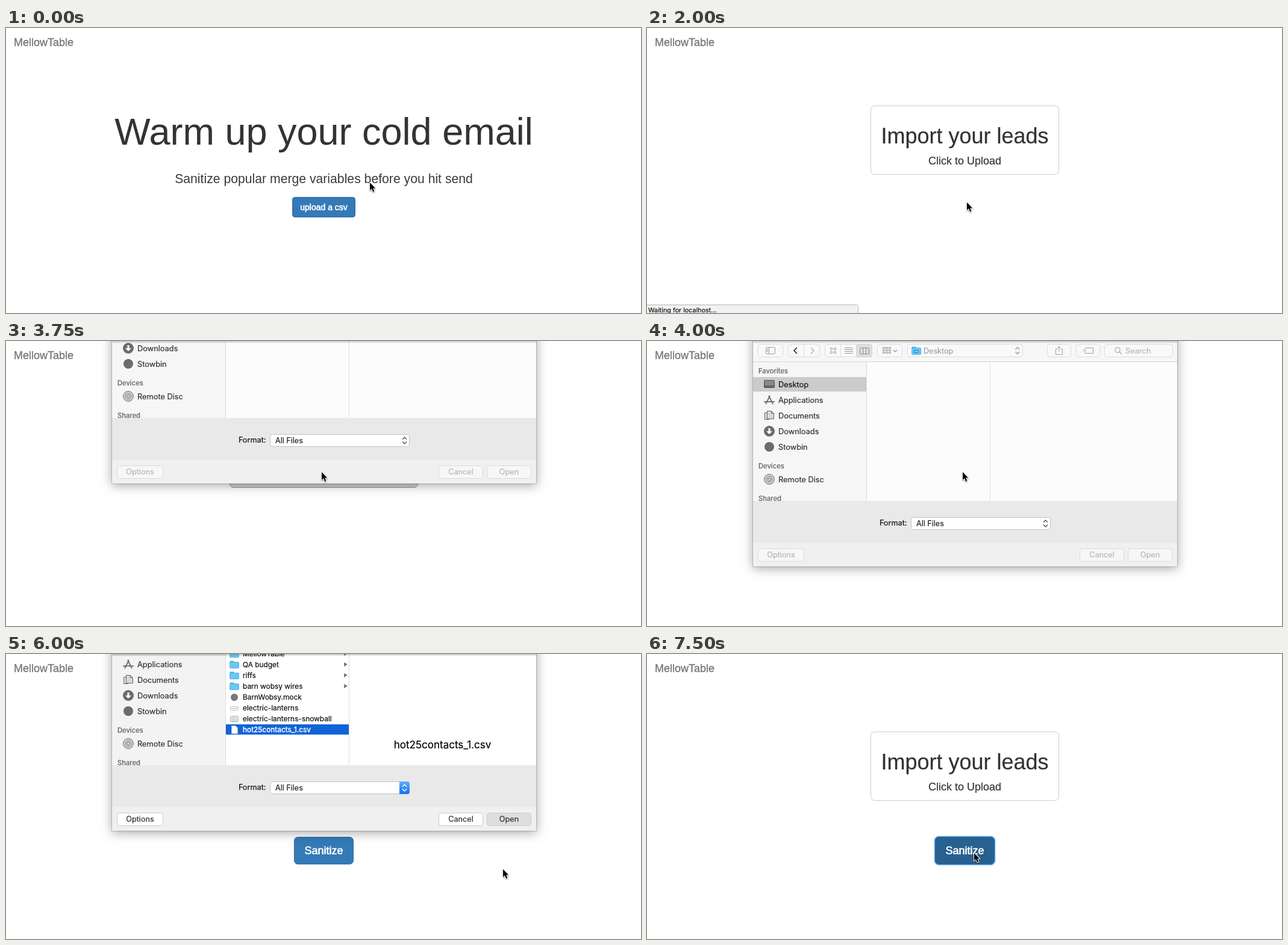
An HTML page with a canvas that plays this animation: 1054x474 px, repeating every 8 s.

```html
<!DOCTYPE html>
<html lang="en">
<head>
<meta charset="utf-8">
<title>Upload flow</title>
<style>
html, body { margin: 0; width: 100%; height: 100%; overflow: hidden; background: #fff; }
canvas { display: block; }
</style>
</head>
<body>
<canvas id="stage" width="1054" height="474"></canvas>
<script>
const ctx = document.getElementById('stage').getContext('2d');
const LOOP = 8000, STEP = 250;
const SANS = '"Liberation Sans", Arial, sans-serif';
const UI = 'Inter, Roboto, sans-serif';

// cursor keys: time, x, y
const CURSOR = [
  [0, 604, 257], [500, 531, 290], [2000, 531, 290], [2500, 524, 218],
  [4250, 524, 218], [4750, 490, 207], [5000, 490, 207], [5500, 825, 358],
  [6250, 825, 358], [7250, 543, 331]
];

const FILES = [
  ['pond_test.html', 'dot'], ['pond-seo.png', 'thumb'], ['MellowTable', 'folder'],
  ['QA budget', 'folder'], ['riffs', 'folder'], ['barn wobsy wires', 'folder'],
  ['BarnWobsy.mock', 'disc'], ['electric-lanterns', 'thumb'],
  ['electric-lanterns-snowball', 'page'], ['hot25contacts_1.csv', 'doc']
];

function text(str, x, y, size, color, opt = {}) {
  const heavy = opt.heavy ?? .2;
  ctx.font = `${opt.weight || 400} ${size}px ${opt.font || UI}`;
  ctx.textAlign = opt.align || 'left';
  ctx.fillStyle = color;
  ctx.fillText(str, x, y);
  if (heavy) {
    ctx.strokeStyle = color;
    ctx.lineWidth = heavy;
    ctx.strokeText(str, x, y);
  }
}

function rect(x, y, w, h, color) {
  ctx.fillStyle = color;
  ctx.fillRect(x, y, w, h);
}

function box(x, y, w, h, r, fill, stroke) {
  ctx.beginPath();
  ctx.roundRect(x + .5, y + .5, w - 1, h - 1, r);
  if (fill) { ctx.fillStyle = fill; ctx.fill(); }
  if (stroke) { ctx.strokeStyle = stroke; ctx.lineWidth = 1; ctx.stroke(); }
}

function line(pts, color, width = 1, fill) {
  ctx.beginPath();
  for (let i = 0; i < pts.length; i += 2) ctx.lineTo(pts[i], pts[i + 1]);
  if (fill) { ctx.closePath(); ctx.fillStyle = fill; ctx.fill(); }
  if (color) { ctx.strokeStyle = color; ctx.lineWidth = width; ctx.stroke(); }
}

function circle(x, y, r, fill, stroke, width = 1) {
  ctx.beginPath();
  ctx.arc(x, y, r, 0, 7);
  if (fill) { ctx.fillStyle = fill; ctx.fill(); }
  if (stroke) { ctx.strokeStyle = stroke; ctx.lineWidth = width; ctx.stroke(); }
}

function vGrad(y0, y1, a, b) {
  const g = ctx.createLinearGradient(0, y0, 0, y1);
  g.addColorStop(0, a);
  g.addColorStop(1, b);
  return g;
}

function upDown(x, y, color) {
  line([x - 3.5, y - 2, x, y - 5.5, x + 3.5, y - 2], color, 1.4);
  line([x - 3.5, y + 2, x, y + 5.5, x + 3.5, y + 2], color, 1.4);
}

function folder(x, y, w, h) {
  box(x, y, w * .5, 5, 1, '#4aaede');
  box(x, y + 2, w, h - 2, 1, '#6cc7f4', '#55b5e6');
}

function primary(x, y, w, h, r, label, size, base, hover, focus) {
  if (focus) {
    ctx.save();
    ctx.shadowColor = '#5fa8f5';
    ctx.shadowBlur = 2;
    box(x - 1.5, y - 1.5, w + 3, h + 3, r + 1.5, '#66aaf2');
    ctx.restore();
  }
  box(x, y, w, h, r, hover ? '#286090' : '#337ab7', focus ? '#2a66a6' : hover ? '#204d74' : '#2e6da4');
  text(label, x + w / 2, base, size, '#fff', { font: SANS, align: 'center', heavy: .6 });
}

function home(t) {
  const mid = { font: SANS, align: 'center', heavy: 0 };
  text('Warm up your cold email', 527.5, 194, 63, '#333', mid);
  text('Sanitize popular merge variables before you hit send', 527.5, 258, 21.2, '#3a3a3a', mid);
  primary(475, 281, 105, 34, 4, 'upload a csv', 14, 303, t >= 500, t >= 750);
}

function importPage(t) {
  const mid = { font: SANS, align: 'center' };
  const pressed = t >= 2750 && t < 6250;
  const gray = t >= 2500 && t < 7500;
  box(371, 129, 313, 115, 6, pressed ? '#d4d4d4' : gray ? '#e6e6e6' : '#fff',
    pressed ? '#8c8c8c' : gray ? '#a0a0a0' : '#ccc');
  if (pressed) rect(372, 130, 311, 6, vGrad(130, 136, 'rgba(0,0,0,.12)', 'rgba(0,0,0,0)'));
  text('Import your leads', 527.5, 192, 36, '#333', mid);
  text('Click to Upload', 527.5, 227, 18, '#333', mid);
  if (t >= 6000) primary(478, 304, 99, 46, 6, 'Sanitize', 18, 333, t >= 7250, t >= 7500);
}

function statusBar(alpha) {
  ctx.globalAlpha = alpha;
  box(-4, 460, 355, 20, 3, '#f2f2f2', '#b4b4b4');
  text('Waiting for localhost...', 2, 473, 10.8, '#111');
  ctx.globalAlpha = 1;
}

function toolbar(on) {
  const ink = on ? '#4a4a4a' : '#9a9a9a', pale = '#b8b8b8';
  const edge = on ? '#cdcdcd' : '#dcdcdc', face = on ? '#fff' : '#f9f9f9';
  rect(176, 0, 704, 37, on ? vGrad(0, 37, '#f3f3f3', '#ececec') : '#f7f7f7');
  rect(176, 36, 704, 1, '#d4d4d4');
  for (const [x, w] of [[184, 42], [234, 53], [295, 79], [382, 42], [432, 192], [664, 40], [712, 40], [759, 114]])
    box(x, 7, w, 22, 4, face, edge);
  rect(260, 8, 1, 20, edge);
  rect(321, 8, 1, 20, edge);

  box(197, 12, 16, 12, 1, null, ink);
  line([202.5, 12, 202.5, 24], ink);
  for (const y of [15, 17, 19]) rect(199, y, 2, 1, ink);

  line([249, 13, 244, 18, 249, 23], on ? pale : '#222', 1.6);
  line([272, 13, 277, 18, 272, 23], pale, 1.6);

  for (let i = 0; i < 4; i++) box(304 + i % 2 * 6, 13 + (i >> 1) * 6, 4, 4, .5, null, ink);
  for (let i = 0; i < 4; i++) rect(328, 13 + i * 3, 14, 1, ink);
  box(347, 7, 27, 22, 3, on ? '#6b6b6b' : '#dedede', on ? '#666' : '#d2d2d2');
  const col = on ? '#fff' : '#8c8c8c';
  box(353, 13, 16, 11, 1, null, col);
  line([358.5, 13, 358.5, 24], col);
  line([363.5, 13, 363.5, 24], col);

  for (let i = 0; i < 9; i++) box(391 + i % 3 * 5, 12 + (i / 3 | 0) * 4, 4, 3, 0, null, ink);
  line([409, 17, 412, 20, 415, 17], ink, 1.4);

  folder(439, 11, 16, 14);
  box(443, 17, 8, 5, 0, null, '#1d82bd');
  text('Desktop', 459, 23, 12.6, on ? '#4a4a4a' : '#a0a0a0');
  upDown(615, 18, ink);

  line([681, 15.5, 678.5, 15.5, 678.5, 24.5, 689.5, 24.5, 689.5, 15.5, 687, 15.5], ink);
  line([684, 20, 684, 11], ink);
  line([681, 14, 684, 11, 687, 14], ink);
  line([724.5, 18, 728, 13.5, 740.5, 13.5, 740.5, 22.5, 728, 22.5, 724.5, 18], ink);
  circle(728.5, 18, 1, ink);

  circle(781, 17, 4.2, null, on ? '#777' : '#aaa', 1.3);
  line([784, 20, 788, 24], on ? '#777' : '#aaa', 1.5);
  text('Search', 794, 23, 12.8, on ? '#a6a6a6' : '#b8b8b8');
}

const SIDE_ICONS = [
  y => {
    box(194, y - 7, 18, 13, 1.5, '#8a8a8a', '#4b4b4b');
    rect(195, y + 2, 16, 3, '#555');
    for (let i = 0; i < 5; i++) rect(197 + i * 3, y + 3, 1, 1, '#ddd');
  },
  y => {
    line([197, y + 7, 204, y - 7], '#666', 1.7);
    line([202, y - 7, 209, y + 7], '#666', 1.7);
    line([194, y + 3, 212, y + 3], '#666', 1.7);
  },
  y => {
    line([195.5, y - 4.5, 202.5, y - 4.5, 202.5, y + 6.5, 195.5, y + 6.5, 195.5, y - 4.5], '#666', 1, '#ddd');
    line([199.5, y - 7.5, 206.5, y - 7.5, 210.5, y - 3.5, 210.5, y + 5.5, 199.5, y + 5.5, 199.5, y - 8], '#666', 1, '#d8d8d8');
    line([206.5, y - 7.5, 206.5, y - 3.5, 210.5, y - 3.5], '#666');
  },
  y => {
    circle(203, y, 9, '#6c6c6c');
    rect(201.5, y - 5, 3, 6, '#fff');
    line([198, y, 208, y, 203, y + 5], null, 1, '#fff');
  },
  y => circle(203, y, 8, '#6c6c6c')
];

function sidebar(on) {
  const ink = '#303030', gray = '#6c6c6c', head = { weight: 500 };
  rect(176, 37, 188, 231, on ? '#f3f3f3' : '#f6f6f6');
  rect(176, 62, 188, 24, on ? '#e4e4e4' : '#cbcbcb');
  text('Favorites', 185, 56, 11.2, gray, head);
  ['Desktop', 'Applications', 'Documents', 'Downloads', 'Stowbin'].forEach((name, i) => {
    const y = 74 + i * 26;
    SIDE_ICONS[i](y);
    text(name, 218, y + 5, 12.8, i ? ink : '#111');
  });
  text('Devices', 185, 214, 11.2, gray, head);
  circle(203, 232, 8.5, '#c9c9c9', '#777');
  circle(203, 232, 4.5, null, '#888');
  circle(203, 232, 1.8, '#fff', '#777');
  text('Remote Disc', 218, 237, 12.8, ink);
  text('Shared', 185, 268, 11.2, gray, head);
}

function fileIcon(kind, y) {
  if (kind === 'folder') folder(371, y - 7, 16, 13);
  if (kind === 'dot') circle(379, y - 1, 4, '#c8574a');
  if (kind === 'disc') circle(379, y, 6, '#777');
  if (kind === 'thumb') {
    box(372, y - 3, 14, 7, 1, '#fff', '#bbb');
    rect(374, y, 10, 1, '#aaa');
  }
  if (kind === 'page') {
    box(372, y - 5, 14, 10, 1, '#f4f4f4', '#aaa');
    for (const d of [-3, -1, 1, 3]) rect(374, y + d, 10, 1, '#c4c4c4');
  }
  if (kind === 'doc')
    line([374.5, y - 6.5, 381, y - 6.5, 384.5, y - 3, 384.5, y + 6.5, 374.5, y + 6.5, 374.5, y - 7], '#bbb', 1, '#fff');
}

function files(chosen) {
  FILES.forEach(([name, kind], i) => {
    const y = 47 + i * 18, hit = chosen && i === 9;
    if (hit) rect(365, 200, 204, 17, '#1164d8');
    fileIcon(kind, y);
    text(name, 393, y + 4, 11.9, hit ? '#fff' : '#111', { heavy: hit ? .4 : .2 });
    if (kind === 'folder') line([561, y - 4, 567, y - 1, 561, y + 3], null, 1, '#777');
  });
  if (chosen) text('hot25contacts_1.csv', 724.5, 240, 17, '#000', { align: 'center' });
}

function pushButton(x, w, label, on, down) {
  box(x, 347, w, 22, 4, down ? '#dedede' : on ? '#fff' : '#f7f7f7', on ? '#cbcbcb' : '#dadada');
  text(label, x + w / 2, 362, 12.7, on ? '#303030' : '#b5b5b5', { align: 'center' });
}

function dialog(t) {
  const on = t >= 4250, chosen = t >= 5000;
  const dy = t < 4000 ? -140 : t < 4250 ? -2 : t < 6000 ? 0 : -83;
  ctx.save();
  ctx.translate(0, dy);
  ctx.save();
  ctx.shadowColor = 'rgba(0,0,0,.36)';
  ctx.shadowBlur = 17;
  ctx.shadowOffsetY = 3;
  rect(176, -20, 704, 397, '#efefef');
  ctx.restore();
  box(175, -20, 706, 398, 0, null, 'rgba(0,0,0,.16)');

  rect(364, 37, 516, 231, on ? '#fff' : '#fcfcfc');
  toolbar(on);
  sidebar(on);
  rect(364, 37, 1, 231, '#dadada');
  if (on) files(chosen);
  rect(569, 37, 1, 231, '#dedede');

  rect(176, 268, 704, 70, '#e9e9e9');
  rect(176, 338, 704, 39, '#f0f0f0');
  text('Format:', 431.5, 309, 12.7, '#111', { align: 'right' });
  box(438, 295, 232, 21, 4, '#fff', '#c2c2c2');
  text('All Files', 447, 310, 12.6, '#222');
  if (on) {
    ctx.beginPath();
    ctx.roundRect(653, 295, 17, 21, [0, 4, 4, 0]);
    ctx.fillStyle = vGrad(295, 316, '#60aefb', '#1570f2');
    ctx.fill();
  }
  upDown(661.5, 305.5, on ? '#fff' : '#555');
  pushButton(184, 77, 'Options', on);
  pushButton(718, 74, 'Cancel', on);
  pushButton(798, 74, 'Open', chosen, t >= 5750);
  ctx.restore();
  rect(176, 0, 705, 4, vGrad(0, 4, 'rgba(0,0,0,.22)', 'rgba(0,0,0,0)'));
}

function cursorAt(t) {
  let a = CURSOR[0];
  for (const b of CURSOR) {
    if (b[0] > t) {
      const p = (t - a[0]) / (b[0] - a[0]), e = p * p * (3 - 2 * p);
      return [a[1] + (b[1] - a[1]) * e, a[2] + (b[2] - a[2]) * e];
    }
    a = b;
  }
  return [a[1], a[2]];
}

function cursor(t) {
  const [x, y] = cursorAt(t);
  ctx.save();
  ctx.translate(x, y);
  ctx.lineJoin = 'round';
  ctx.shadowColor = 'rgba(0,0,0,.4)';
  ctx.shadowBlur = 2;
  ctx.shadowOffsetY = 1;
  const arrow = [0, 0, 0, 13, 3, 10.2, 5.2, 15.4, 7.4, 14.5, 5.2, 9.5, 9.2, 9.5, 0, 0];
  line(arrow, '#fff', 2, '#fff');
  ctx.shadowColor = 'transparent';
  line(arrow, null, 1, '#000');
  ctx.restore();
}

function draw(now) {
  const t = Math.floor(now % LOOP / STEP) * STEP;
  rect(0, 0, 1054, 474, '#fff');
  text('MellowTable', 13, 30, 18, '#777', { font: SANS, heavy: .35 });
  if (t < 2000) home(t); else importPage(t);
  if (t >= 1250 && t < 2250) statusBar(t < 1500 ? .5 : 1);
  if (t >= 3750 && t < 6250) dialog(t);
  cursor(t);
}

const start = performance.now();
function tick() {
  draw(performance.now() - start);
  requestAnimationFrame(tick);
}
tick();
</script>
</body>
</html>
```
